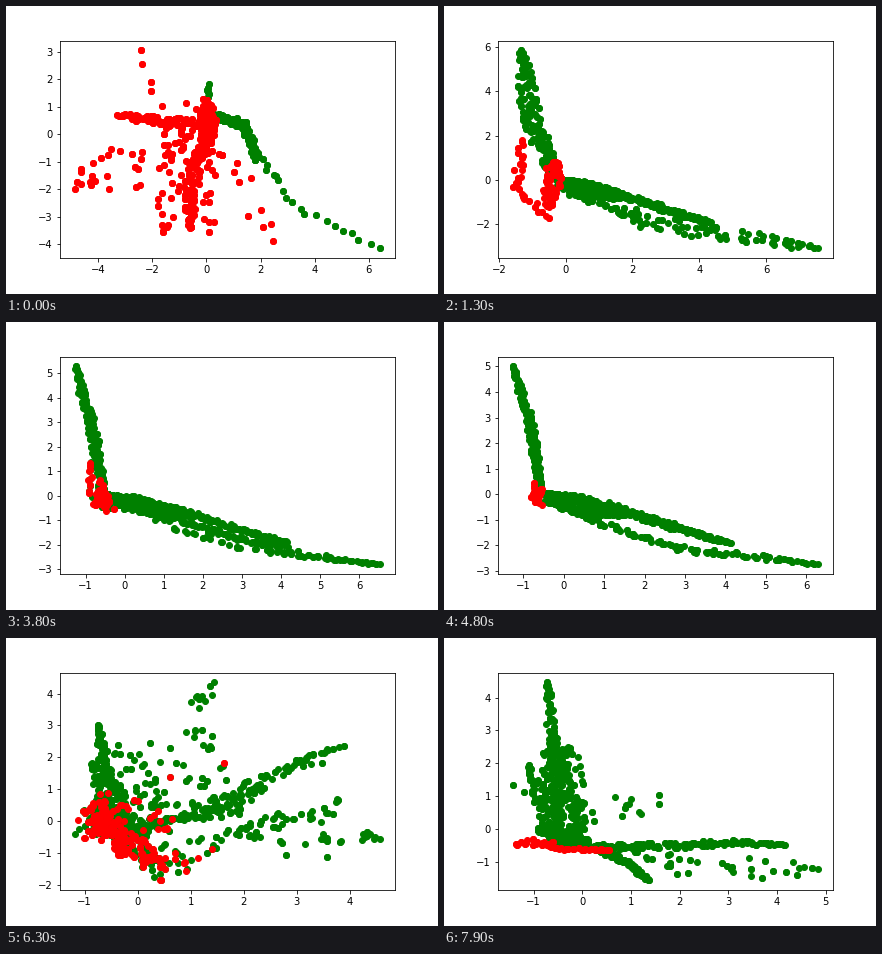
Write a matplotlib script that moves like this. It is 432 by 288 pixels and loops after 8000 ms.

```python
import numpy as np
import matplotlib.pyplot as plt
from matplotlib.animation import FuncAnimation

FRAMES, STEP = 80, 100
COUNT = 1200
RED, GREEN = 0, 1
rng = np.random.default_rng(7)


def strand(color, n, width, *path, thin=1.0):
    """n points along a polyline; lens-shaped spread, sparser at the end if thin > 1."""
    p = np.array(path, float)
    s = np.r_[0, np.cumsum(np.hypot(*np.diff(p, axis=0).T))]
    u = np.linspace(0, 1, n) ** thin
    spread = 2 * width * np.sqrt(u * (1 - u))
    x = np.interp(u * s[-1], s, p[:, 0]) + spread * rng.uniform(-1, 1, n)
    y = np.interp(u * s[-1], s, p[:, 1]) + spread * rng.uniform(-1, 1, n)
    return np.c_[x, y, np.full(n, color)]


def pose(*strands):
    """One cloud, ordered from upper left to lower right."""
    p = np.vstack(strands)
    p = p[np.argsort(1.6 * p[:, 0] - p[:, 1])]
    return p[np.arange(COUNT) * len(p) // COUNT]


def spider():
    """Red cross on the left, green arc falling to the right."""
    return pose(
        strand(RED, 80, .17, (.1, .4), (-2, .5), (-3.3, .7), thin=1.3),
        strand(RED, 85, .3, (-.05, 1.25), (.1, .3), (-.05, -.4)),
        strand(RED, 95, .25, (0, 0), (-.35, -1), (-.65, -2), (-.6, -3.4)),
        strand(RED, 48, .9, (0, -.1), (-1.5, -.6), (-3, -1.2), (-4.8, -1.75), thin=1.3),
        strand(RED, 24, .5, (-1, -.3), (-1.3, -2), (-1.6, -3.55)),
        strand(RED, 12, .3, (.1, -1), (.1, -3.55)),
        strand(RED, 7, .3, (-.4, .9), (-1.6, 1), (-2.43, 3.05)),
        strand(RED, 13, .5, (.2, -.6), (1, -1), (2.45, -3.9), thin=1.3),
        strand(GREEN, 14, .1, (-.05, .6), (.1, 1.83)),
        strand(GREEN, 110, .14, (.2, .75), (1.3, .35), (1.7, -.3), (1.8, -.95)),
        strand(GREEN, 24, .15, (1.75, -.5), (2.7, -1.8), (3.4, -2.6), (4.4, -3.2),
               (6.4, -4.15), thin=1.6))


def ell(c, mid, left, right, loose, r):
    """Green L with its corner at x = c; r scales the red patch beside it."""
    return pose(
        strand(GREEN, 150, loose, (c - .1, .2), (mid, 2.8), left, thin=1.3),
        strand(GREEN, 240, .12, (c, .05), (c + .8, -.12), (c + 1.9, -.62),
               (c + 3.6, -1.5), (c + 4.6, -1.9), thin=1.8),
        strand(GREEN, 170, .25, (c, 0), (c + .9, -.45), (c + 2, -.75)),
        strand(GREEN, 120, loose, (c, -.25), (c + 1.2, -1), (c + 2.4, -1.7),
               (c + 3.7, -2.2), (c + 4.8, -2.35), right, thin=1.4),
        strand(RED, 10 + int(60 * r), .3 * r, (c - .1, .8 * r), (c - .25, -1.2 * r)),
        strand(RED, 4 + int(24 * r), .15 * r, (c - 1.05 * r, 1.8 * r),
               (c - 1.25 * r, -.4 * r), (c - .25 * r, -1.7 * r)))


def vee():
    """Green arm rising to the right out of a red heap."""
    return pose(
        strand(GREEN, 95, .1, (.25, -.2), (1.05, .42), (1.7, 1.2), (2.5, 2.2),
               (3.5, 3.65), (4.1, 4.3), (4.56, 4.42), thin=1.2),
        strand(GREEN, 22, .7, (.2, .9), (1.2, 2.3), (2.3, 3.7), (3.18, 6.2)),
        strand(GREEN, 50, .7, (.3, -.4), (1.2, -.7), (2.5, -.4), (4.43, .35), thin=1.4),
        strand(GREEN, 14, .4, (-.4, 1.7), (1.6, 1.5)),
        strand(GREEN, 60, .17, (-.75, 1.75), (-.62, .9), (-.45, -.2)),
        strand(GREEN, 70, .13, (-.55, 0), (-.3, -.27), (.35, -.27)),
        strand(RED, 50, .25, (-.4, -.35), (-.85, -.6), (-1.27, -1.3), thin=1.3),
        strand(RED, 90, .32, (-.5, -.4), (-.1, -.8), (-.1, -1.6), (-.2, -2.1)),
        strand(RED, 11, .4, (-.2, .2), (1.2, .65)),
        strand(RED, 9, .25, (0, -.8), (.5, -1.5)))


def fan(peak, spur, edge, rise, dip, tail, stray, reds):
    """Green spire on the left, flat strip with a dipping and a far branch."""
    x, y = peak
    return pose(
        strand(GREEN, 75, .1, peak, (x + .1, .55 * y), (-.58, 0)),
        strand(GREEN, 45, .12, spur, (-.8, .4), (-.65, -.2)),
        strand(GREEN, 130, .3, (x + .1, .65 * y), (-.5, 1), (-.35, -.4)),
        strand(GREEN, 55, .25, (-.3, 2.5), (-.2, 1.2), (-.05, -.3)),
        strand(GREEN, 110, .2, (-.9, 0), (-.6, -.1), (.1, -.4)),
        strand(GREEN, 4, .1, edge, (-.9, .9)),
        strand(GREEN, 170, .09, (-.6, -.45), (.3, -.54), (2, -.5),
               ((2 + rise[0]) / 2, .5 * rise[1] - .15), rise, thin=1.5),
        strand(GREEN, 80, .07, (.2, -.55), (.6 * dip[0] + .05, .62 * dip[1]), dip),
        strand(GREEN, 40, .35, (.5, -.7), (1.8, -.95), (3.1, -1.2), tail, thin=1.2),
        strand(GREEN, 14, .5, (0, .2), stray),
        strand(RED, 20, .1, (-.6, -.4), (-.95, -.4), (-1.37, -.45)),
        strand(RED, 24, .03, (-.68, -.52), (-.45, -.6), (reds, -.62)))


times = [0, 1300, 2800, 4800, 5700, 6900, 7900]
poses = [
    spider(),
    ell(-.25, -1.05, (-1.33, 5.84), (7.54, -3.05), .3, 1),
    ell(-.43, -.85, (-1.27, 5.56), (6.77, -2.87), .18, .6),
    ell(-.47, -.83, (-1.25, 5), (6.28, -2.73), .1, .25),
    vee(),
    fan((-.74, 4.25), (-1, 2.4), (-1.08, .5), (4.3, .9), (1.07, -1.9),
        (4.73, -1.18), (2.18, 3.05), -.3),
    fan((-.72, 4.46), (-1.1, 1.95), (-1.42, 1.33), (4.17, -.48), (1.36, -1.55),
        (4.83, -1.22), (1.57, 1.05), .55),
]
flip = rng.uniform(0, 1, COUNT)

fig, ax = plt.subplots(figsize=(6, 4), dpi=72)
fig.subplots_adjust(left=.125, right=.9, bottom=.125, top=.88)


def draw(i):
    t = i * STEP
    k = min(np.searchsorted(times, t, side="right"), len(times) - 1)
    f = (t - times[k - 1]) / (times[k] - times[k - 1])
    a, b = poses[k - 1], poses[k]
    p = a + (b - a) * f
    # each point changes class at its own moment on the way
    green = np.where(f <= flip, a[:, 2], b[:, 2]) == GREEN
    ax.clear()
    ax.plot(p[green, 0], p[green, 1], "o", color="green")
    ax.plot(p[~green, 0], p[~green, 1], "o", color="red")


anim = FuncAnimation(fig, draw, frames=FRAMES, interval=STEP,
                     init_func=lambda: None, repeat=True, repeat_delay=0)
plt.show()
```
